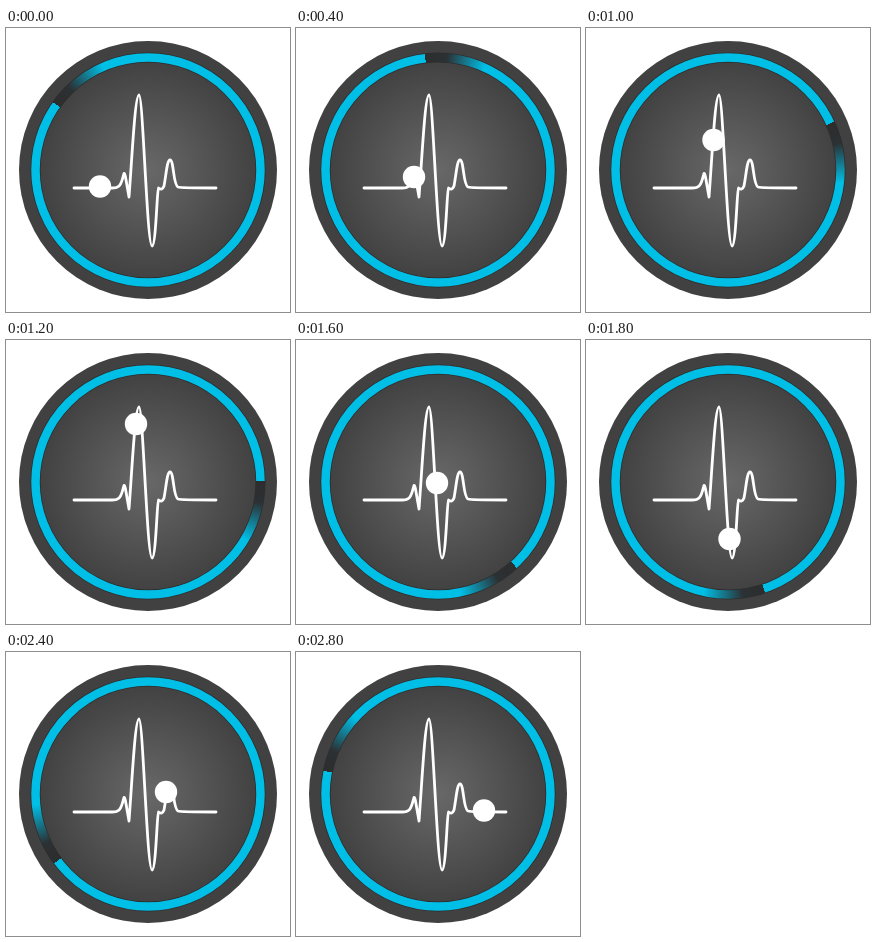
An HTML page with a canvas that plays this animation: 284 px wide and 284 px high, repeating every 3 s.

```html
<!DOCTYPE html>
<html lang="en">
<head>
<meta charset="utf-8">
<title>Pulse monitor</title>
<style>
  html, body { margin: 0; width: 100%; height: 100%; overflow: hidden; background: #fff; }
  canvas { display: block; width: 284px; height: 284px; }
</style>
</head>
<body>
<canvas id="stage"></canvas>
<script>
const LOOP = 3000, STEP = 200, SIZE = 284, CENTER = 142;
const BLUE = '#00bfe6', DARK = '#2d2d2d';
const RING_RADIUS = 112.5, RING_WIDTH = 8.5;
const GAP_START = 305.5;

const wave = new Path2D(
  'M68 160H106C113 160 115 158 117.5 147Q118.3 143 119.5 149L123 169' +
  'C126 130 129 67 133 67C137 67 141 218 146 218' +
  'C150 218 151 161 152.5 160Q156 163 158 158' +
  'C160 148 161 132 164 132C168 132 167 157 172 159C175 160 180 160 210 160');

// Ball position at each step of the beat
const ballStops = [
  [94, 158.5], [108, 158.5], [118, 149], [123, 165], [125, 140],
  [127.5, 112], [130, 84], [136, 88], [141, 143], [143.5, 199],
  [147.5, 204], [151, 172], [160, 140], [169, 153], [188, 158.5]
];

const canvas = document.getElementById('stage');
const ratio = window.devicePixelRatio || 1;
canvas.width = canvas.height = SIZE * ratio;
const ctx = canvas.getContext('2d');
ctx.scale(ratio, ratio);

const faceShade = ctx.createRadialGradient(CENTER, CENTER, 0, CENTER, CENTER, 108);
faceShade.addColorStop(0, '#686868');
faceShade.addColorStop(1, '#424242');

function disc(x, y, radius, fill) {
  ctx.beginPath();
  ctx.arc(x, y, radius, 0, Math.PI * 2);
  ctx.fillStyle = fill;
  ctx.fill();
}

function ring(radius, width, stroke) {
  ctx.beginPath();
  ctx.arc(CENTER, CENTER, radius, 0, Math.PI * 2);
  ctx.lineWidth = width;
  ctx.strokeStyle = stroke;
  ctx.stroke();
}

// Angles run clockwise from the top
function gapGradient(degrees) {
  const start = (degrees - 90) * Math.PI / 180;
  const shade = ctx.createConicGradient(start, CENTER, CENTER);
  shade.addColorStop(0, DARK);
  shade.addColorStop(11 / 360, '#2b3134');
  shade.addColorStop(31 / 360, BLUE);
  shade.addColorStop(1, BLUE);
  return shade;
}

function draw(now) {
  const step = Math.floor((now % LOOP) / STEP);
  ctx.clearRect(0, 0, SIZE, SIZE);
  disc(CENTER, CENTER, 129, '#414141');
  disc(CENTER, CENTER, 108, faceShade);
  ring(RING_RADIUS, RING_WIDTH + 1.6, DARK);
  ring(RING_RADIUS, RING_WIDTH, gapGradient(GAP_START + step * 360 * STEP / LOOP));

  ctx.strokeStyle = '#fff';
  ctx.lineWidth = 2.8;
  ctx.lineCap = ctx.lineJoin = 'round';
  ctx.stroke(wave);
  const [x, y] = ballStops[step];
  disc(x, y, 11.2, '#fff');
  requestAnimationFrame(() => draw(performance.now()));
}

draw(performance.now());
</script>
</body>
</html>
```
